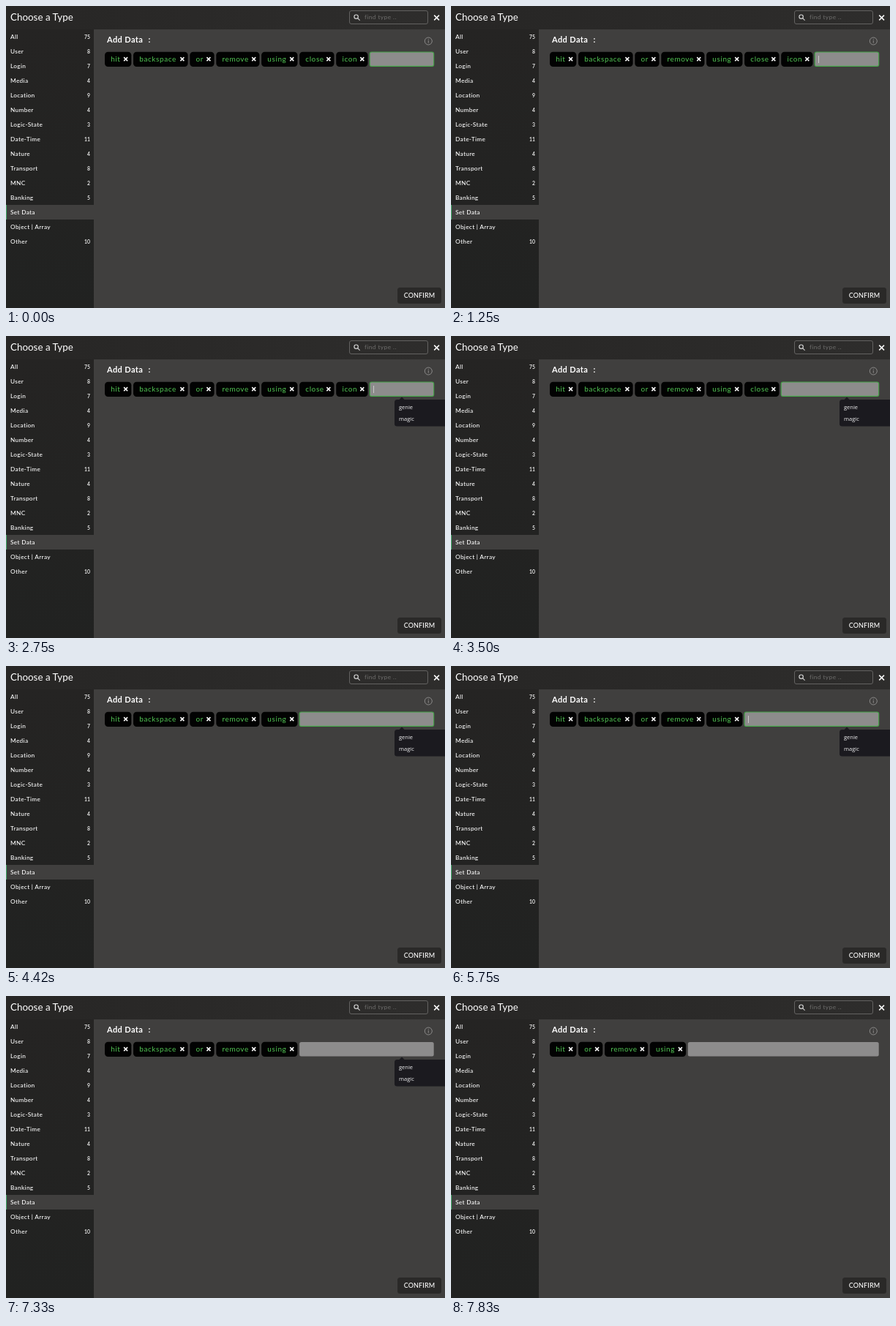
These frames come from a looping animation (600x413 px, 8000 ms). An HTML page:

```html
<!DOCTYPE html>
<html lang="en">
<head>
<meta charset="utf-8">
<title>Choose a Type</title>
<style>
  html, body { margin: 0; width: 100%; height: 100%; overflow: hidden; background: #403f3e; }
  svg { display: block; width: 600px; height: 413px; font-family: Lato, "Open Sans", sans-serif; }
  text { fill: #fff; white-space: pre; }
  .title { font-size: 13.4px; }
  .item { font-size: 8.3px; letter-spacing: .3px; font-weight: 500; }
  .count { font-size: 6.8px; font-weight: 600; text-anchor: end; }
  .hint { font-size: 8.4px; letter-spacing: .4px; fill: #6f6e6d; }
  .head { font-size: 11px; letter-spacing: .4px; font-weight: 700; }
  .chip { font-size: 10px; letter-spacing: .6px; fill: #52c654; }
  .button { font-size: 9px; font-weight: 500; letter-spacing: .1px; text-anchor: middle; }
  .option { font: 7.5px "Open Sans", "Noto Sans", sans-serif; fill: #f0f0f2; }
  .cross { stroke: #fff; stroke-width: 1.5; }
  .line { fill: none; stroke: #636261; }
</style>
</head>
<body>
<svg viewBox="0 0 600 413">
  <defs>
    <linearGradient id="side" x2="0" y2="1">
      <stop stop-color="#252423"/><stop offset="1" stop-color="#212221"/>
    </linearGradient>
    <linearGradient id="bar">
      <stop stop-color="#272625"/><stop offset="1" stop-color="#2e2d2c"/>
    </linearGradient>
  </defs>
  <rect width="600" height="413" fill="#403f3e"/>
  <rect y="32" width="120" height="381" fill="url(#side)"/>
  <rect width="600" height="32" fill="url(#bar)"/>
  <text class="title" x="6" y="19.5">Choose a Type</text>
  <rect class="line" x="469.5" y="6.5" width="107" height="18" rx="2.5"/>
  <g fill="none" stroke="#d2d2d2" stroke-width="1.2">
    <circle cx="478.6" cy="14.7" r="2.7"/><path d="M480.6 16.7l3 3"/>
  </g>
  <text class="hint" x="490" y="18.3">find type ..</text>
  <path class="cross" d="M585.2 12.6l6.8 6.8m0-6.8l-6.8 6.8"/>
  <g id="menu"></g>
  <text class="head" x="138" y="49.8">Add Data</text>
  <text class="head" x="194.5" y="49.8">:</text>
  <g fill="none" stroke="#8b8a89">
    <circle cx="577.3" cy="48" r="5"/><path d="M577.3 47.2v3.4m0-5.4v1.1"/>
  </g>
  <rect x="535" y="385" width="60" height="22" rx="3.5" fill="#2a2928"/>
  <text class="button" x="565" y="398.8">CONFIRM</text>
  <g id="chips"></g>
  <rect id="input" y="63" height="19.4" rx="2.5" fill="#8d8c8c"/>
  <rect id="caret" y="68" width="1" height="10" fill="#c9c8c8"/>
  <g id="popup">
    <path d="M537 87.5l4-4 4 4z" fill="#1b1a1f"/>
    <rect x="531" y="87" width="73" height="36.5" rx="3.5" fill="#1b1a1f"/>
    <text class="option" x="537" y="99.5">genie</text>
    <text class="option" x="537" y="115.7">magic</text>
  </g>
</svg>
<script>
const LOOP = 8000;
const $ = id => document.getElementById(id);
const set = (el, attrs) => {
  for (const key in attrs) el.setAttribute(key, attrs[key]);
};

const menu = [
  ["All", 75], ["User", 8], ["Login", 7], ["Media", 4], ["Location", 9],
  ["Number", 4], ["Logic-State", 3], ["Date-Time", 11], ["Nature", 4],
  ["Transport", 8], ["MNC", 2], ["Banking", 5], ["Set Data", ""],
  ["Object | Array", ""], ["Other", 10]
];
$("menu").innerHTML =
  `<rect y="272" width="120" height="20" fill="#403f3e"/>
   <rect y="272" width="1" height="20" fill="#3fa866"/>` +
  menu.map(([name, count], i) =>
    `<text class="item" x="6" y="${44.6 + i * 20}">${name}</text>
     <text class="count" x="115" y="${44.6 + i * 20}">${count}</text>`).join("");

// Chip label, width and time of removal
const chips = [
  ["hit", 36.3], ["backspace", 74.6, 7420], ["or", 33.3], ["remove", 59.1],
  ["using", 49.3], ["close", 47.4, 4420], ["icon", 43.3, 3500]
].map(([label, width, end = Infinity]) => ({ label, width, end }));

for (const chip of chips) {
  chip.el = document.createElementNS("http://www.w3.org/2000/svg", "g");
  chip.el.innerHTML =
    `<rect y="62.7" width="${chip.width}" height="20.3" rx="4.5" fill="#020202"/>
     <text class="chip" x="8.2" y="75.8">${chip.label}</text>
     <path class="cross" d="M${chip.width - 10.2} 70.1l5 5m0-5l-5 5"/>`;
  $("chips").append(chip.el);
}

function caretOn(t) {
  if (t < 1670) return (t + 750) % 1000 < 500;
  if (t < 2250) return true;
  return t < 7250 && (t + 250) % 1000 < 500;
}

function draw(now) {
  const t = now % LOOP;
  let x = 135;
  for (const { el, width, end } of chips) {
    const shown = t < end;
    set(el, { transform: `translate(${x})`, visibility: shown ? "visible" : "hidden" });
    if (shown) x += width + 2.7;
  }
  const focused = t < 7330;
  set($("input"), {
    x,
    width: 584.7 - x,
    stroke: focused ? "#43a447" : "#8d8c8c",
    "stroke-width": focused ? 1.1 : 0
  });
  set($("caret"), { x: Math.round(x + 4.8), opacity: caretOn(t) ? 1 : 0 });
  const fade = Math.min(1, Math.max(0, (7500 - t) / 170));
  set($("popup"), { opacity: t < 1670 ? 0 : fade });
}

const start = performance.now();
function tick() {
  draw(performance.now() - start);
  requestAnimationFrame(tick);
}
tick();
</script>
</body>
</html>
```
